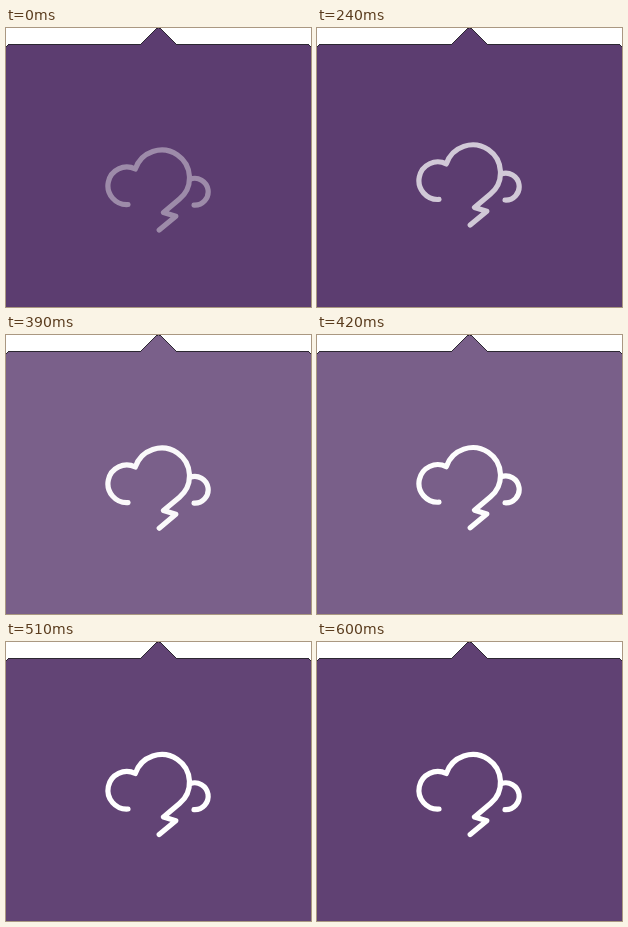
Write an HTML page that moves like this. It is 305 by 279 pixels and loops after 1.26 s.

```html
<!DOCTYPE html>
<html lang="en">
<head>
<meta charset="utf-8">
<title>Storm card</title>
<style>
  html, body { margin: 0; width: 100%; height: 100%; overflow: hidden; background: #fff; }
  svg { display: block; width: 305px; height: 279px; }
</style>
</head>
<body>
<svg viewBox="0 0 305 279">
  <path id="card" stroke="#2c2732" stroke-width="1" shape-rendering="crispEdges"
    d="M-.5 280V20.5Q.5 16.5 4.5 16.5H134.5L150.5 .8Q152.5 -.8 154.5 .5L170.8 16.5H300.5Q304.5 16.5 305.5 20.5V280Z"/>
  <g id="icon" fill="none" stroke="#fff" stroke-width="5.2" stroke-linecap="round" stroke-linejoin="round">
    <path d="M122 167A18.8 18.8 0 1 1 129.3 131.5A27.8 27.8 0 1 1 173.5 161.6L157.5 175L169.8 178.8L153.2 192.6"/>
    <path d="M184 141.7A13.4 13.4 0 1 1 188 167.6"/>
  </g>
</svg>
<script>
const LOOP = 1260, STEP = 30, END = 600, RISE = 460;
const card = document.getElementById('card');
const icon = document.getElementById('icon');
const base = [92, 61, 112];

// Smooth 0-1-0 pulse between two times
function pulse(t, from, to) {
  return t > from && t < to ? Math.sin(Math.PI * (t - from) / (to - from)) ** 2 : 0;
}

function draw(time) {
  const t = Math.min(Math.floor(time / STEP) * STEP, END);
  const held = t < 60 ? 0 : t;
  const rise = (1 - Math.cos(Math.PI * Math.min(held / RISE, 1))) / 2;
  const flash = 0.23 * (pulse(t, 356, 453) + pulse(t, 495, 612));

  icon.setAttribute('transform', `translate(0 ${9.5 * (1 - rise)})`);
  icon.setAttribute('opacity', 0.4 + 0.6 * rise);
  card.setAttribute('fill', `rgb(${base.map(c => Math.round(c + (255 - c) * flash))})`);
}

const start = performance.now();
function tick() {
  draw((performance.now() - start) % LOOP);
  requestAnimationFrame(tick);
}
tick();
</script>
</body>
</html>
```
